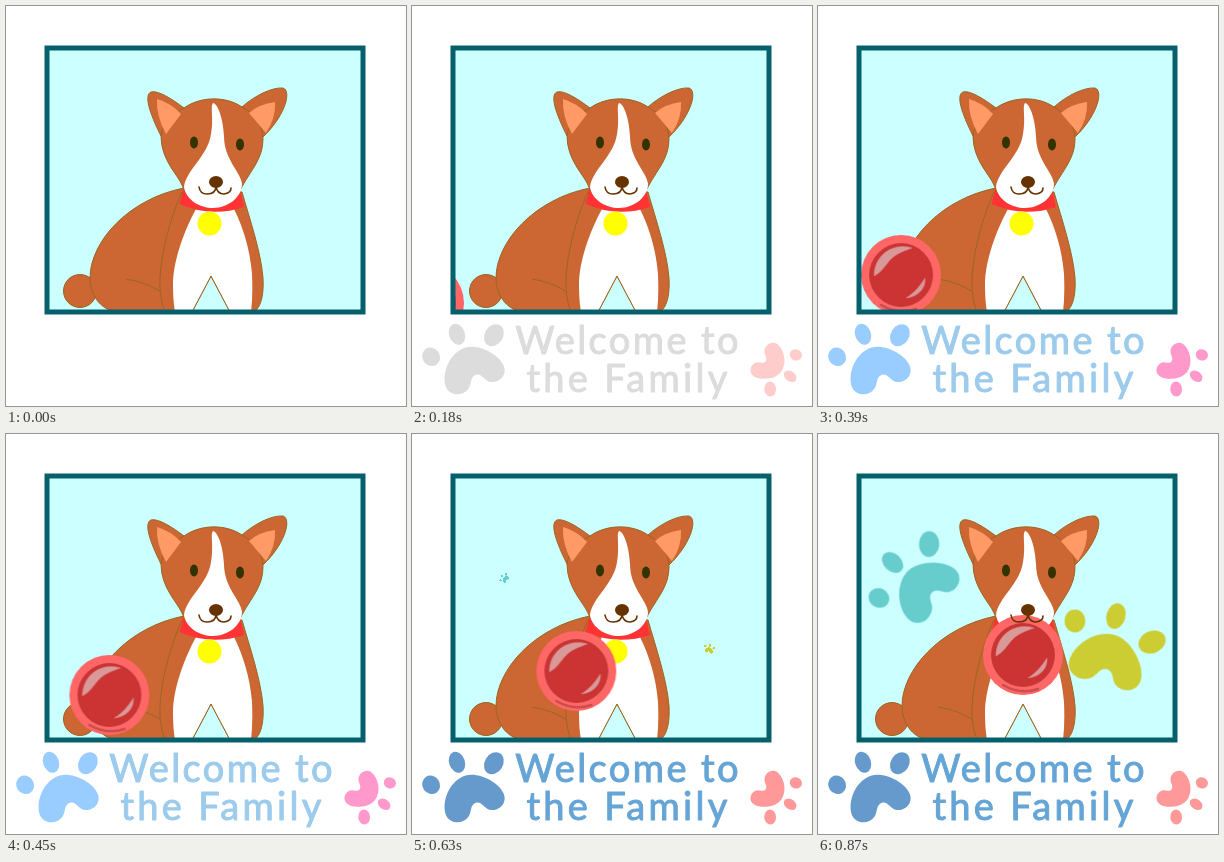
These frames come from a looping animation (400x400 px, 900 ms). An HTML page:

```html
<!DOCTYPE html>
<html lang="en">
<head>
<meta charset="utf-8">
<title>Welcome to the Family</title>
<style>
  html, body { margin: 0; width: 100%; height: 100%; overflow: hidden; background: #fff; }
  svg { display: block; width: 100vw; height: 100vh; }

  .fur { fill: #cc6633; stroke: #996622; stroke-width: 1; }
  .line { fill: none; stroke: #996622; stroke-width: 1; }
  .ear { fill: #ff9966; }
  .white { fill: #fff; }
  .mouth { fill: none; stroke: #663300; stroke-width: 1.6; stroke-linecap: round; }
  .shine { fill: #d99999; stroke: #d98080; stroke-width: .6; }
  .shade { fill: none; stroke: #cc4d4d; stroke-width: 2.5; stroke-linecap: round; }

  .ball { animation: roll 900ms infinite; }
  .pop { animation: grow 900ms infinite; }
  .teal { color: #66cccc; transform-origin: 92px 144px; }
  .lime { color: #cccc33; transform-origin: 298px 215px; }
  .blue { animation: blue 900ms step-end infinite; }
  .pink { animation: pink 900ms step-end infinite; }
  .words {
    font: 38px Lato, "Open Sans", sans-serif;
    letter-spacing: 2.4px;
    text-anchor: middle;
    fill: currentColor;
    stroke: currentColor;
    stroke-width: 1;
    stroke-linejoin: round;
    animation: words 900ms step-end infinite;
  }
  .wide { letter-spacing: 3.3px; }

  /* one pose every 30 ms */
  @keyframes roll {
    0% { transform: translate(-49px, 321px); animation-timing-function: steps(25); }
    83.33%, 100% { transform: translate(205px, 221px); }
  }
  @keyframes grow {
    0% { transform: scale(0); animation-timing-function: step-end; }
    66.66% { transform: scale(0); animation-timing-function: steps(9); }
    96.66%, 100% { transform: scale(1); }
  }
  @keyframes blue {
    0% { color: #fff; }
    6.66% { color: #f8f8f8; }
    13.33% { color: #eee; }
    16.66% { color: #dcdcdc; }
    26.66% { color: #ccddf5; }
    30% { color: #99ccff; }
    56.66% { color: #66cccc; }
    66.66%, 100% { color: #6699cc; }
  }
  @keyframes pink {
    0% { color: #fff; }
    6.66% { color: #fff8f8; }
    13.33% { color: #ffe4e4; }
    16.66% { color: #ffcccc; }
    43.33% { color: #ff99cc; }
    56.66%, 100% { color: #ff9999; }
  }
  @keyframes words {
    0% { color: #fff; }
    6.66% { color: #f8f8f8; }
    13.33% { color: #eee; }
    16.66% { color: #dcdcdc; }
    26.66% { color: #c8d8f2; }
    30% { color: #a9ccfb; }
    43.33% { color: #9ccbec; }
    56.66% { color: #66bfd0; }
    66.66%, 100% { color: #65a5d6; }
  }
</style>
</head>
<body>
<svg viewBox="0 0 400 400">
  <defs>
    <clipPath id="window"><rect x="41" y="42" width="316" height="263"/></clipPath>
    <g id="paw" fill="currentColor">
      <ellipse cx="-40" rx="10.500" ry="11.500" transform="rotate(-15 -40 0)"/>
      <ellipse cx="-1.7" cy="-15.5" rx="9.5" ry="13"/>
      <ellipse cx="40" rx="14" ry="11" transform="rotate(-40 40 0)"/>
      <path d="M2 3C18 3 37 22 39 37C41 50 28 57 18 52C11 49 12 39 4 38C-4 38 -4 47 -10 51C-20 58 -36 52 -35 38C-33 20 -16 3 2 3Z"/>
    </g>
  </defs>

  <rect x="41" y="42" width="316" height="264" fill="#ccffff"/>

  <g clip-path="url(#window)">
    <circle class="fur" cx="74" cy="285" r="16.5"/>
    <path class="fur" d="M178 182C122 193 84 236 84 272C84 290 96 306 114 306H165L190 230Z"/>
    <path class="line" d="M120 273Q140 276 155 286"/>
    <path class="fur" d="M176 186C160 222 153 260 154 282C155 296 158 306 161 306H186L205 270L224 306H247C255 303 258 288 257 272C255 246 244 214 236 186Z"/>
    <path class="white" d="M190 203C178 225 167 255 167 279Q167 295 169 306H186L205 270L224 306H245Q247 290 246 268C244 243 237 221 228 203Z"/>
    <path class="line" d="M186 306L205 270L224 306"/>

    <path d="M178 181L173.500 198Q205 212 238 201L234 184Z" fill="#ff3333"/>
    <circle cx="203.500" cy="217.500" r="12" fill="#ffff00"/>

    <path class="fur" d="M178 102C166 93 152 84 145 86C138 89 143 106 155 130Z"/>
    <path class="fur" d="M236 101C248 90 266 81 277 82C286 85 279 110 257 131Z"/>
    <path class="fur" stroke-width=".6" d="M178 102C195 90 220 90 236 101C249 108 257 120 257 133C257 152 246 163 237 179C230 194 220 200 207 201C193 201 181 193 176 179C172 169 155 154 155 130C156 118 166 108 178 102Z"/>
    <path class="ear" d="M151 93Q165 97 175 108L160 128Q150 110 151 93Z"/>
    <path class="ear" d="M269 96Q253 98 243 107L260 127Q270 112 269 96Z"/>
    <path class="white" d="M207 97C204 100 208 112 205 128C202 150 180 164 178 181C180 194 194 202 207 202C222 202 236 191 236 178C235 166 218 154 218 130C217 112 212 98 207 97Z"/>
    <ellipse cx="188" cy="136.500" rx="4" ry="6" fill="#333300"/>
    <ellipse cx="234" cy="138.500" rx="4" ry="6" fill="#333300"/>

    <g class="ball">
      <circle r="40" fill="#ff6666"/>
      <path class="shade" d="M-20 30Q-3 40 15 34"/>
      <circle r="31.500" fill="#cc3333" stroke="#b83a3a" stroke-width=".8"/>
      <path class="shine" d="M-27 1C-27 -20 -8 -33 11 -27C3 -24 -4 -22 -10 -16C-16 -10 -19 -3 -27 1Z"/>
      <path class="shine" d="M24 3C25 14 16 22 5 23C13 18 18 12 24 3Z"/>
    </g>

    <ellipse cx="210" cy="176" rx="7" ry="6" fill="#663300"/>
    <path class="mouth" d="M193 181Q194 188 201 188Q210 188 210 180Q211 188 218 188Q225 187 225 182"/>

    <g class="pop teal"><use href="#paw" transform="translate(86 137) rotate(-47) scale(.92)"/></g>
    <g class="pop lime"><use href="#paw" transform="translate(295.500 197.500) rotate(15.300)"/></g>
  </g>

  <rect x="41" y="42" width="316" height="264" fill="none" stroke="#06606c" stroke-width="5"/>

  <g class="blue"><use href="#paw" transform="translate(50.500 340) rotate(-19) scale(.83)"/></g>
  <g class="pink"><use href="#paw" transform="translate(371 366) rotate(127) scale(.535)"/></g>

  <g class="words">
    <text x="216" y="347.500">Welcome to</text>
    <text class="wide" x="216.500" y="386">the Family</text>
  </g>
</svg>
</body>
</html>
```
